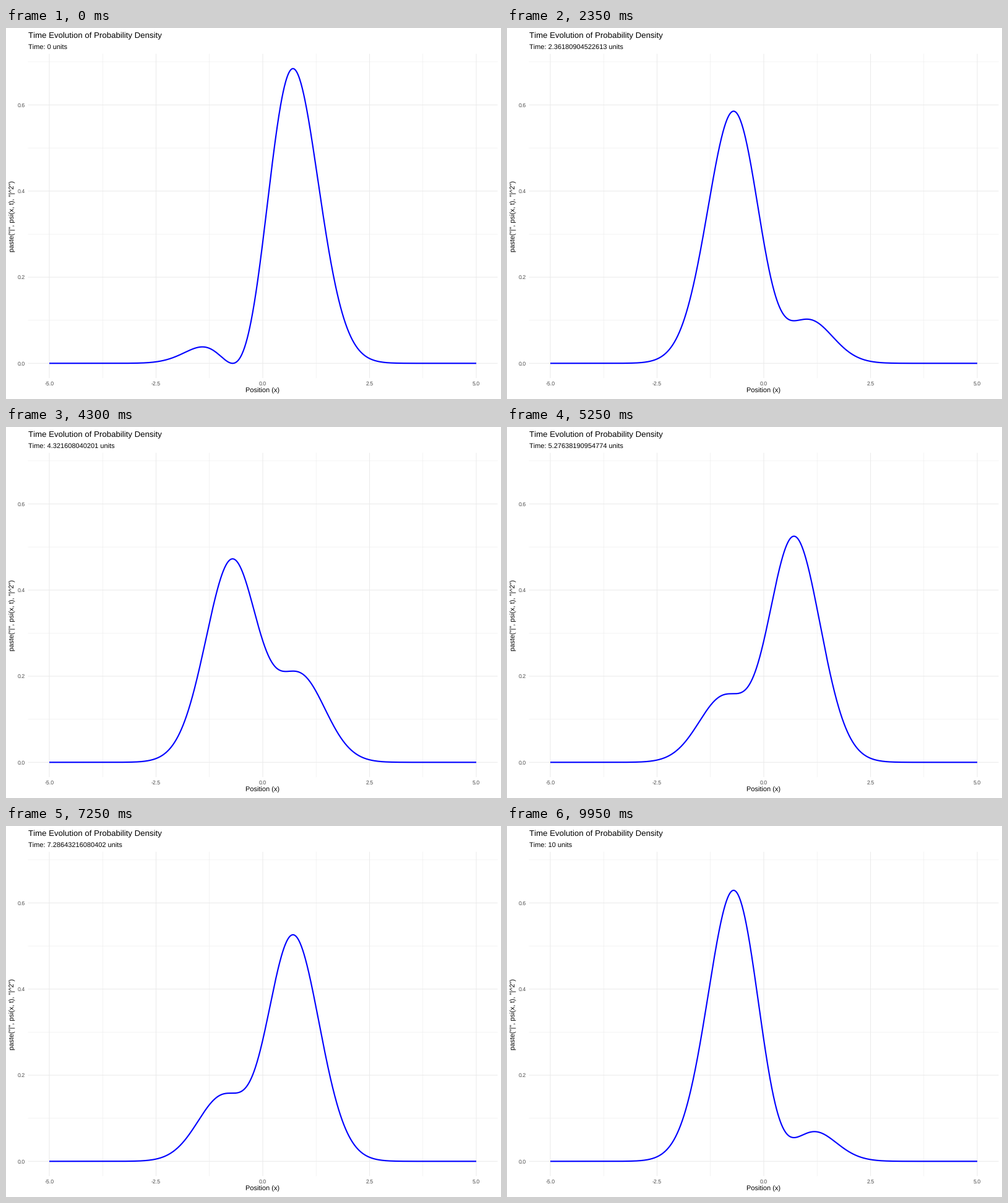
Recreate the animation shown at these times as a matplotlib script. Size 800 by 600 pixels, loop 10 s.

```python
import numpy as np
import matplotlib.pyplot as plt
from matplotlib.animation import FuncAnimation

W, H, DPI = 800, 600, 100
FRAMES, INTERVAL, T_END = 200, 50, 10
PANEL = (35.5, 794.5, 41.8, 566.1)  # left, right, top, bottom
PT = 72 / DPI  # points per pixel

plt.rcParams.update({
    "font.family": "Liberation Sans",
    "text.hinting": "none",
    "text.kerning_factor": 6,
    "text.parse_math": False,
    "path.snap": False,
    "lines.solid_capstyle": "butt",
    "lines.solid_joinstyle": "round",
})

fig = plt.figure(figsize=(W / DPI, H / DPI), dpi=DPI, facecolor="white")
ax = fig.add_axes([0, 0, 1, 1])
ax.set_xlim(0, W)
ax.set_ylim(H, 0)
ax.axis("off")


def px(x):
    return 415 + 69 * x


def py(y):
    return 542.3 - 696.4 * y


def label(x, y, text, size=11, color="black", **kw):
    return ax.text(x, y, text, fontsize=size * PT, color=color,
                   va="baseline", **kw)


def grid(xs, ys, width):
    left, right, top, bottom = PANEL
    style = dict(color="#ebebeb", lw=width * PT)
    for y in ys:
        ax.plot([left, right], [py(y)] * 2, **style)
    for x in xs:
        ax.plot([px(x)] * 2, [top, bottom], **style)


def density(x, t):
    """Equal mix of the two lowest harmonic oscillator states."""
    envelope = np.exp(-x ** 2) / np.sqrt(np.pi)
    return envelope * (0.5 + x ** 2 + np.sqrt(2) * x * np.cos(t))


x_ticks = np.arange(-5, 5.1, 2.5)
y_ticks = np.arange(4) * 0.2
grid(x_ticks[:-1] + 1.25, y_ticks + 0.1, 0.53)
grid(x_ticks, y_ticks, 1.07)

for v in x_ticks:
    label(px(v), 578, f"{v:.1f}", 8.8, "#4d4d4d", ha="center")
for v in y_ticks:
    label(30.5, py(v) + 3.3, f"{v:.1f}", 8.8, "#4d4d4d", ha="right")

label(35.7, 16, "Time Evolution of Probability Density", 13.2)
label(415, 590, "Position (x)", ha="center")
label(14, 304.3, 'paste("|", psi(x, t), "|^2")', ha="center",
      rotation=90, rotation_mode="anchor")
clock = label(35.7, 35, "")

xs = np.linspace(-5, 5, 1000)
curve, = ax.plot(px(xs), py(density(xs, 0)), color="#0000ff", lw=2.13 * PT)


def update(i):
    t = T_END * i / (FRAMES - 1)
    curve.set_ydata(py(density(xs, t)))
    clock.set_text(f"Time: {t:.15g} units")
    return curve, clock


anim = FuncAnimation(fig, update, frames=FRAMES, interval=INTERVAL,
                     repeat=True, repeat_delay=0)
plt.show()
```
